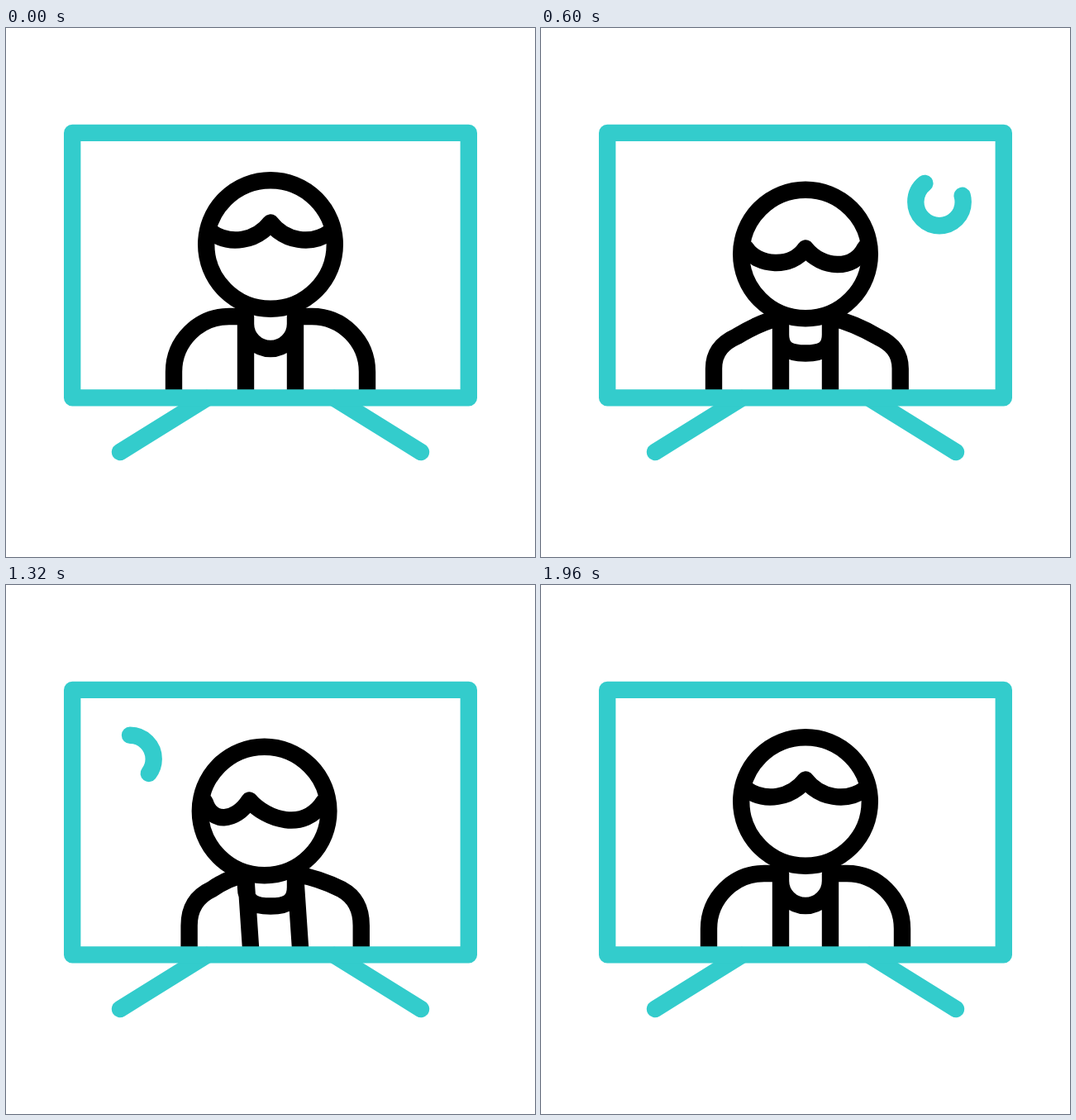
Write an HTML page that moves like this. It is 640 px wide and 640 px high and loops after 2000 ms.

```html
<!DOCTYPE html>
<html lang="en">
<head>
<meta charset="utf-8">
<title>Presenter on TV</title>
<style>
  html, body { margin: 0; width: 100%; height: 100%; overflow: hidden; background: #fff; }
  svg {
    display: block;
    width: 100%;
    height: 100%;
    fill: none;
    stroke-width: 20.4px;
    stroke-linecap: round;
    stroke-linejoin: round;
  }
  .teal { stroke: #33cccc; }
  .ink { stroke: #000; }
</style>
</head>
<body>
<svg viewBox="0 0 640 640">
  <g class="ink">
    <path id="body"/>
    <g id="head">
      <circle r="77.8"/>
      <path id="hair"/>
    </g>
  </g>
  <g class="teal">
    <path id="right" pathLength="360" d="M482 181.8a28.7 28.7 0 1 0 0 57.4a28.7 28.7 0 1 0 0-57.4"/>
    <path id="left" pathLength="360" d="M150 181.8a28.7 28.7 0 1 1 0 57.4a28.7 28.7 0 1 1 0-57.4"/>
    <path d="M138 513L242.6 448M502 513L397.4 448"/>
    <rect x="80.2" y="126.9" width="479.6" height="320.5"/>
  </g>
</svg>
<script>
  const LOOP = 2000;
  const ROUND = 0.5523; // Bézier handle length of a quarter circle
  const [body, head, hair, right, left] =
    ["body", "head", "hair", "right", "left"].map(id => document.getElementById(id));

  // Eased progress from 0 to 1 between two times
  function ease(time, from, to) {
    const x = Math.min(1, Math.max(0, (time - from) / (to - from)));
    return x * x * (3 - 2 * x);
  }

  // The hairline in head coordinates; its parting slides with the turn
  function hairPath(drop, turn, lift) {
    const start = [-72, -15 + 8 * drop - 4 * lift];
    const peak = [18 * turn - 2 * lift, -26.5 + 19.5 * drop - 6 * lift];
    const end = [72, -15 + 7.5 * drop + 5.5 * lift + 10.5 * turn];
    const leftWave = [
      -49 - 9 * drop + 7 * turn, 1.3 + 13.2 * drop,
      -17 + 15 * turn - 5 * lift, -4 + 22 * drop - 4 * lift
    ];
    const rightWave = [
      17 + 3 * drop + 14 * turn - 5 * lift, -4 + 22 * drop - 11 * lift - 4 * turn,
      49 + 9 * drop - 10 * lift, 1.3 + 19 * drop + lift - 5 * turn
    ];
    return `M${start}C${leftWave},${peak}C${rightWave},${end}`;
  }

  // Upper arm, rounded elbow, then a slope up to the collar
  function shoulder(arm, x, y, collar, drop) {
    const bend = 416 - 4 * drop;
    const top = 349 + drop;
    const handles = [arm, bend + ROUND * (y - bend), x + ROUND * (arm - x), y + 7 * drop];
    const slope = [(x + collar) / 2, (y + top) / 2 - 5 * drop];
    return `M${arm} 446V${bend}C${handles},${x},${y}Q${slope},${collar},${top}`;
  }

  function neckline(drop, turn, lift) {
    const top = 349 + drop;
    const side = 358 + 13 * drop - 2 * lift + 4 * turn;
    const bottom = 388 + 5.5 * drop - 5 * lift;
    const corner = side + (ROUND + 0.25 * drop) * (bottom - side);
    const reach = 30 * ROUND + 2.4 * drop;
    return `M290 ${top}V${side}C290 ${corner} ${320 - reach} ${bottom} 320 ${bottom}` +
      `C${320 + reach} ${bottom} 350 ${corner} 350 ${side}V${top}`;
  }

  function bodyPath(drop, turn, lift) {
    const lean = 2 * lift - 5 * turn;
    const lapel = x => `M${x} ${349 + drop}L${x + lean} 446`;
    const leftArm = shoulder(
      203 + 6 * drop + 3.6 * lift - 10 * turn,
      270 - 33 * drop - 13 * turn,
      349 + 24 * drop - 2 * lift + 3 * turn, 290, drop);
    const rightArm = shoulder(
      437 - 2.3 * drop - 9.7 * lift - 5.3 * turn,
      370 + 38 * drop - 6.5 * lift - 5.3 * turn,
      349 + 25 * drop - 2 * lift + 4 * turn, 350, drop);
    return leftArm + rightArm + lapel(290) + lapel(350) + neckline(drop, turn, lift);
  }

  function drawRing(ring, lead, trail) {
    ring.style.visibility = lead > trail ? "visible" : "hidden";
    ring.setAttribute("stroke-dasharray", `${360 * (lead - trail)} 720`);
    ring.setAttribute("stroke-dashoffset", -360 * trail);
  }

  function draw(time) {
    const back = ease(time, 1560, 1880);
    const toRight = ease(time, 600, 840);
    const drop = ease(time, 120, 360) - back;
    const lift = toRight - back;
    const turn = 1.1 * toRight - 2 * ease(time, 1080, 1320) + 0.9 * back;

    head.setAttribute("transform", `translate(${320 + 8.2 * turn} ${262 + 11.5 * drop})`);
    hair.setAttribute("d", hairPath(drop, turn, lift));
    body.setAttribute("d", bodyPath(drop, turn, lift));
    drawRing(right, ease(time, 120, 800), ease(time, 480, 1080));
    drawRing(left, ease(time, 1080, 1680), ease(time, 1320, 1960));
  }

  const start = performance.now();
  function tick() {
    draw((performance.now() - start) % LOOP);
    requestAnimationFrame(tick);
  }
  tick();
</script>
</body>
</html>
```
